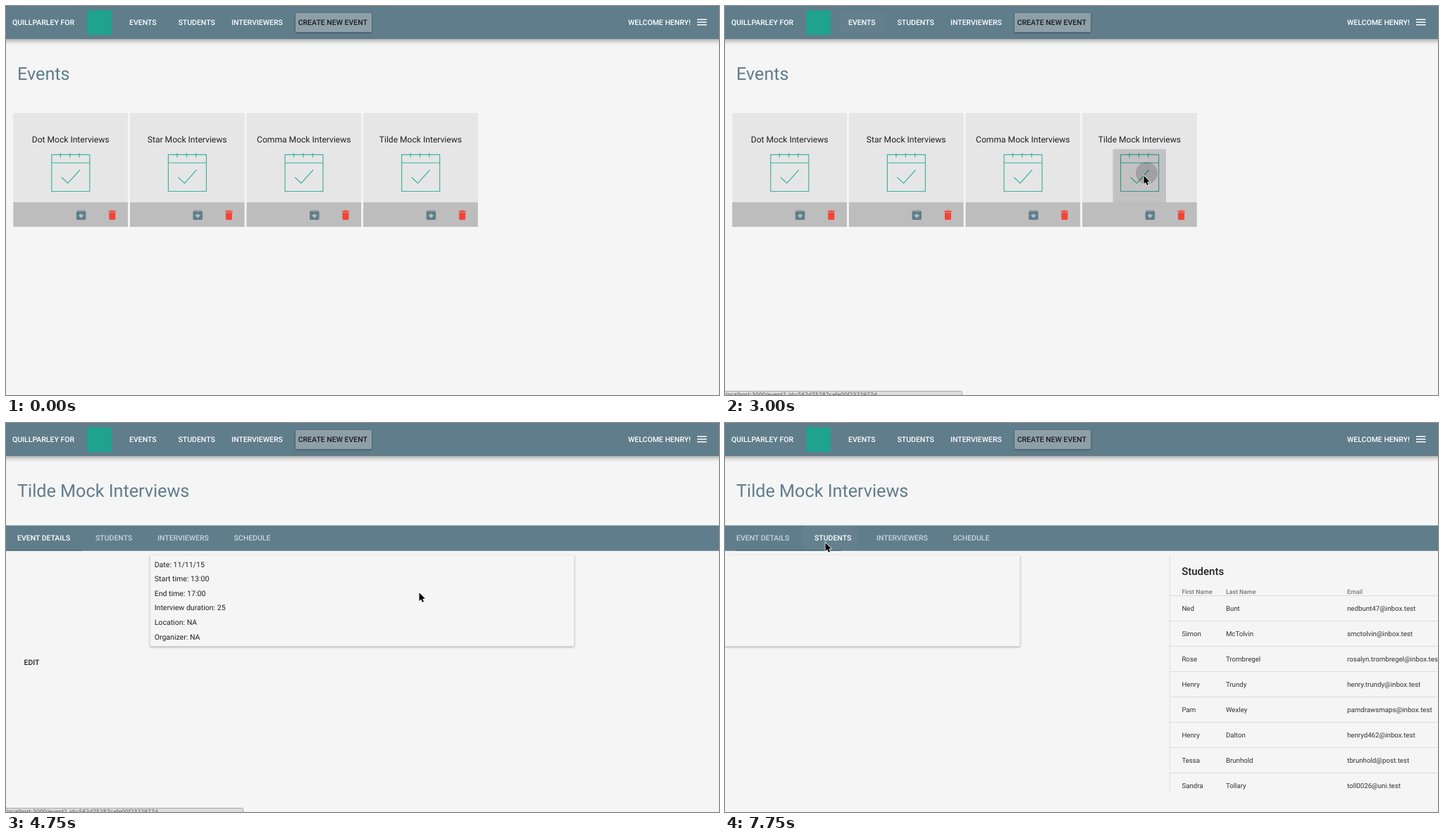
Animation, 1012 px wide and 553 px high, one loop 8 s. Source, as an HTML page:

```html
<!DOCTYPE html>
<html lang="en">
<head>
<meta charset="utf-8">
<title>Events</title>
<style>
  html, body { margin: 0; width: 100%; height: 100%; overflow: hidden; background: #f5f5f5; }
  svg { display: block; width: 1012px; height: 553px; font-family: Roboto, sans-serif; text-rendering: geometricPrecision; }
  .btn { font-size: 10.5px; font-weight: 500; }
  .title { font-size: 25.2px; fill: #607d8b; }
  .card { font-size: 12.1px; text-anchor: middle; fill: #212121; }
  .line { font-size: 10.55px; fill: #212121; }
  .cell { font-size: 9.7px; fill: #333; }
  .head { font-size: 8.8px; font-weight: 500; fill: #777; }
  .paper { fill: #f5f5f5; filter: drop-shadow(0 1px 1.5px rgba(0,0,0,.35)); }
  .bar { fill: #607d8b; filter: drop-shadow(0 2.2px 3.5px rgba(0,0,0,.38)); }
  .raised { fill: #8d9fa9; filter: drop-shadow(0 1px 1.5px rgba(0,0,0,.35)); }
  .icon { fill: none; stroke: #3fb0a0; stroke-width: 1.15; }
</style>
</head>
<body>
<svg id="stage" viewBox="0 0 1012 553"></svg>
<script>
const stage = document.getElementById('stage');

function add(parent, tag, attrs = {}, text) {
  const node = document.createElementNS('http://www.w3.org/2000/svg', tag);
  for (const key in attrs) node.setAttribute(key, attrs[key]);
  if (text !== undefined) node.textContent = text;
  return parent.appendChild(node);
}
const group = (parent, x = 0, y = 0) => add(parent, 'g', { transform: `translate(${x} ${y})` });
const rect = (parent, x, y, width, height, attrs) =>
  add(parent, 'rect', { x, y, width, height, ...attrs });
const label = (parent, cls, x, y, text, attrs) =>
  add(parent, 'text', { class: cls, x, y, ...attrs }, text);
const path = (parent, d, attrs) => add(parent, 'path', { d, ...attrs });
const show = (node, opacity) => { node.style.opacity = opacity; };
const move = (node, x, y) => node.setAttribute('transform', `translate(${x} ${y})`);

// Event list
const ARCHIVE = 'M20.54 5.23l-1.39-1.68C18.88 3.21 18.47 3 18 3H6c-.47 0-.88.21-1.16.55L3.46 5.23C3.17 5.57 3 6.02 3 6.5V19c0 1.1.9 2 2 2h14c1.1 0 2-.9 2-2V6.5c0-.48-.17-.93-.46-1.27zM12 17.5L6.5 12H10v-2h4v2h3.5L12 17.5zM5.12 5l.81-1h12l.94 1H5.12z';
const TRASH = 'M6 19c0 1.1.9 2 2 2h8c1.1 0 2-.9 2-2V7H6v12zM19 4h-3.5l-1-1h-5l-1 1H5v2h14V4z';
const list = group(stage);
label(list, 'title', 16, 105, 'Events');
['Dot', 'Star', 'Comma', 'Tilde'].forEach((name, i) => {
  const card = group(list, 10.3 + i * 165.6, 152);
  rect(card, 0, 0, 162.7, 127, { fill: '#e6e6e6' });
  rect(card, 0, 127, 162.7, 35, { fill: '#bdbdbd' });
  label(card, 'card', 81.3, 41.5, name + ' Mock Interviews');
  path(card, 'M54.5 59.3h54v52.2h-54zM54.5 71h54M67 57v6.5M80.4 57v6.5M93.7 57v6.5M68.5 91.5l9 8.5 17-19',
    { class: 'icon' });
  path(card, ARCHIVE, { fill: '#607d8b', transform: 'translate(87.3 136.3) scale(.75)' });
  path(card, TRASH, { fill: '#f44336', transform: 'translate(131.5 136.3) scale(.75)' });
});
const hover = rect(list, 550.5, 203.5, 75.5, 75.5, { rx: 1.5 });
const ripple = add(list, 'circle', { cx: 598.5, cy: 237.5, r: 15.5, 'fill-opacity': .17 });

// Event page
const page = group(stage);
const title = label(page, 'title', 16, 105, 'Tilde Mock Interviews');
rect(page, 0, 145.6, 1012, 36.2, { fill: '#607d8b' });
const tabGlow = rect(page, 109, 145.6, 79, 36.2, { fill: '#fff', 'fill-opacity': .03, rx: 8 });
const ink = rect(page, 0, 180.3, 109, 1.5, { fill: '#526f7d' });
const tabs = [['EVENT DETAILS', 16], ['STUDENTS', 127], ['INTERVIEWERS', 215], ['SCHEDULE', 323.5]]
  .map(([text, x]) => label(page, 'btn', x, 167, text, { fill: '#fff' }));

const panes = group(page);
rect(panes, 204.5, 188, 602, 129.5, { class: 'paper' });
const details = group(panes);
const values = [
  ['Date:', '11/11/15'], ['Start time:', '13:00'], ['End time:', '17:00'],
  ['Interview duration:', '25'], ['Location:', 'NA'], ['Organizer:', 'NA'],
].map(([key, value], i) => {
  const row = label(details, 'line', 210.7, 204.6 + i * 20.6, key + ' ');
  return add(row, 'tspan', {}, value);
});
const edit = label(page, 'btn', 25.5, 344.2, 'EDIT', { fill: '#212121' });

const students = group(panes, 1018.7, 0);
path(students, 'M.5 188V523', { stroke: '#ddd' });
label(students, '', 17.5, 216.3, 'Students', { 'font-size': 15, 'font-weight': 500, fill: '#212121' });
const columns = [17.7, 80.2, 252.3];
const cells = (cls, y, texts) => texts.forEach((text, i) => label(students, cls, columns[i], y, text));
cells('head', 242.7, ['First Name', 'Last Name', 'Email']);
[
  ['Ned', 'Bunt', 'nedbunt47@inbox.test'],
  ['Simon', 'McTolvin', 'smctolvin@inbox.test'],
  ['Rose', 'Trombregel', 'rosalyn.trombregel@inbox.test'],
  ['Henry', 'Trundy', 'henry.trundy@inbox.test'],
  ['Pam', 'Wexley', 'pamdrawsmaps@inbox.test'],
  ['Henry', 'Dalton', 'henryd462@inbox.test'],
  ['Tessa', 'Brunhold', 'tbrunhold@post.test'],
  ['Sandra', 'Tollary', 'toll0026@uni.test'],
].forEach((row, i) => {
  path(students, `M0 ${245.5 + i * 36}H1000`, { stroke: '#dcdcdc' });
  cells('cell', 266.5 + i * 36, row);
});

// Header
rect(stage, -10, -10, 1032, 57, { class: 'bar' });
const navGlow = rect(stage, 162, 10, 65, 27, { fill: '#fff', rx: 1.5 });
rect(stage, 411, 10, 108, 27, { class: 'raised', rx: 1.5 });
rect(stage, 115, 6, 35, 35, { fill: '#1fa28e' });
[['QUILLPARLEY FOR', 9], ['EVENTS', 175], ['STUDENTS', 244.5], ['INTERVIEWERS', 320],
 ['CREATE NEW EVENT', 414.7, '#1c1c1c']]
  .forEach(([text, x, fill = '#fff']) => label(stage, 'btn', x, 27.2, text, { fill }));
label(stage, 'btn', 883, 26.8, 'WELCOME HENRY!', { fill: '#fff' });
path(stage, 'M981 19.2h13.5M981 23h13.5M981 26.8h13.5', { stroke: '#fff', 'stroke-width': 1.5 });

// Browser status bubble
const status = group(stage);
rect(status, -3, 547.5, 339.5, 12, { fill: '#dcdcdc', stroke: '#aaa', rx: 2 });
label(status, '', 1, 555.3, 'localhost:3000/event?_id=562d75287cafe00f2322977d',
  { 'font-size': 7.7, fill: '#555', style: 'font-family: "DejaVu Sans", sans-serif' });

const cursor = group(stage);
path(cursor, 'M.5 .3V11.9L3.1 9.5 5 13.8 7 13 5.2 8.8H8.9Z',
  { stroke: '#fff', 'stroke-width': 1.5, 'paint-order': 'stroke' });

// Each step lists only what changes: time, then new state.
const LOOP = 8000;
let last = { view: 'list', at: null, glow: 0, hover: 0, ripple: 0, status: 0, tab: 0, slide: 0 };
const steps = [
  [0, {}],
  [500, { at: [714, 91] }],
  [750, { at: [713, 110] }],
  [1250, { at: [655, 183], glow: .07 }],
  [1500, { at: [611, 203], hover: .07, status: .6 }],
  [1750, { at: [596, 239], status: 1 }],
  [2250, { at: [596, 240] }],
  [2750, { at: [594, 241], hover: .155, glow: .035 }],
  [3000, { ripple: 1, glow: .025 }],
  [3250, { view: 'loading', glow: .015 }],
  [3500, { view: 'event', glow: 0 }],
  [4750, { at: [586, 241] }],
  [5000, { at: [405, 221], status: .5 }],
  [5250, { at: [267, 198], status: 0 }],
  [5500, { at: [257, 198] }],
  [5750, { at: [232.5, 198] }],
  [6000, { at: [171, 184] }],
  [6250, { at: [148, 170] }],
  [6500, { at: [144, 168] }],
  [7500, { at: [142, 170], tab: 1, slide: 6 }],
  [7750, { slide: 388 }],
].map(([time, change]) => ({ time, state: last = { ...last, ...change } }));

function render(s) {
  const loaded = s.view === 'event';
  show(list, s.view === 'list' ? 1 : 0);
  show(page, s.view === 'list' ? 0 : 1);
  move(page, 0, loaded ? 0 : -46.5);
  show(title, loaded ? 1 : 0);
  values.forEach(value => value.setAttribute('fill-opacity', loaded ? 1 : 0));

  show(hover, s.hover);
  show(ripple, s.ripple);
  show(navGlow, s.glow);
  show(status, s.status);

  tabs.forEach((tab, i) => show(tab, i === s.tab ? 1 : .68));
  show(tabGlow, s.tab);
  show(details, 1 - s.tab);
  show(edit, 1 - s.tab);
  show(ink, loaded ? 1 : 0);
  const p = s.slide / 388;
  ink.setAttribute('x', 16 * p);
  ink.setAttribute('width', 109 + 40 * p);
  move(panes, -s.slide, 0);

  show(cursor, s.at ? 1 : 0);
  if (s.at) move(cursor, ...s.at);
}

const start = performance.now();
let current = null;
function tick() {
  const t = (performance.now() - start) % LOOP;
  const step = steps.findLast(item => item.time <= t);
  if (step !== current) render((current = step).state);
  requestAnimationFrame(tick);
}
tick();
</script>
</body>
</html>
```
